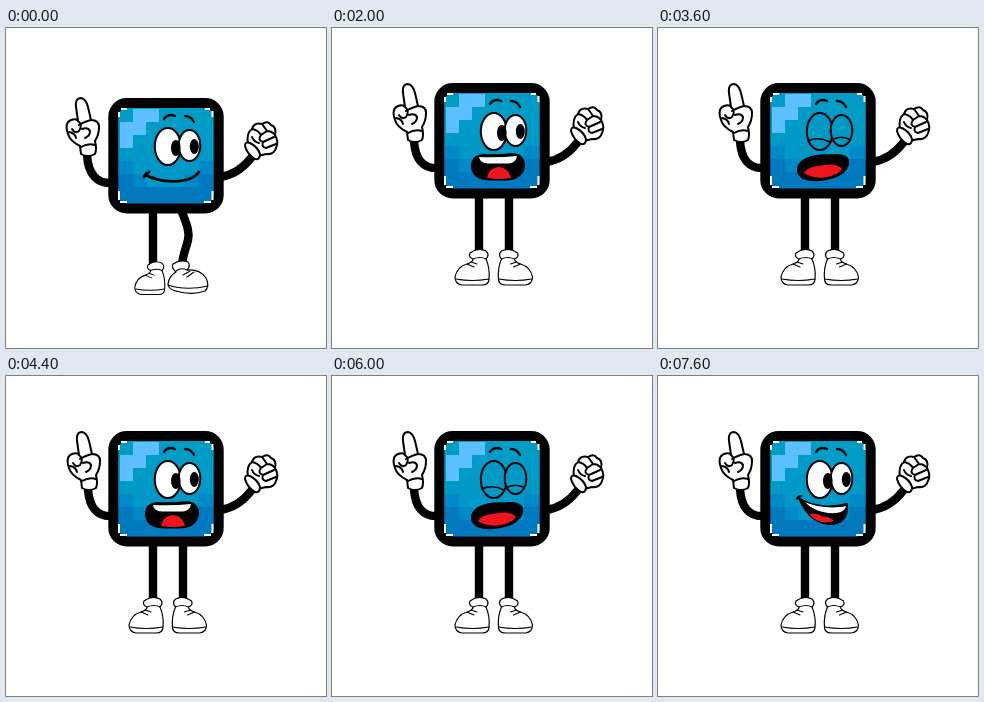
Recreate the animation shown at these times as an HTML page. Size 320 by 320 pixels, loop 8000 ms.

```html
<!DOCTYPE html>
<html lang="en">
<head>
<meta charset="utf-8">
<title>Dancing blue block</title>
<style>
html, body { margin: 0; width: 100%; height: 100%; overflow: hidden; background: #fff; }
svg { display: block; width: 100vw; height: 100vh; }
.line { fill: none; stroke: #000; stroke-linecap: round; stroke-linejoin: round; }
.limb { stroke-width: 8.4; }
.thin { stroke-width: 2; }
.lip { stroke-width: 2.8; }
.lace { stroke-width: 1.1; }
.glove { fill: #fff; stroke: #000; stroke-width: 2; stroke-linejoin: round; stroke-linecap: round; }
.shoe { fill: #fff; stroke: #000; stroke-width: 1.2; stroke-linejoin: round; }
.low { animation: low .8s step-end infinite; }
.high { animation: high .8s step-end infinite; }
.smile { animation: smile 8s step-end infinite; }
.shut { animation: shut 8s step-end infinite; }
.talk { animation: talk 8s step-end infinite; }
@keyframes low { 0% { opacity: 1 } 50%, 100% { opacity: 0 } }
@keyframes high { 0% { opacity: 0 } 50%, 100% { opacity: 1 } }
@keyframes smile { 0%, 30%, 60%, 90%, 100% { opacity: 1 } 10%, 40%, 70% { opacity: 0 } }
@keyframes shut { 10%, 40%, 70% { opacity: 1 } 0%, 20%, 50%, 80%, 100% { opacity: 0 } }
@keyframes talk { 20%, 50%, 80% { opacity: 1 } 0%, 30%, 60%, 90%, 100% { opacity: 0 } }
</style>
</head>
<body>
<svg viewBox="0 0 320 320">
<defs>
  <linearGradient id="sea" x1="0" y1="0" x2="0" y2="1">
    <stop offset="0" stop-color="#009dc6"/>
    <stop offset="1" stop-color="#0096c8"/>
  </linearGradient>

  <g id="block">
    <rect x="107" y="75" width="106" height="106" rx="13" fill="url(#sea)"/>
    <path fill="#5cc0ff" d="M127 81h26v13h-13v13h-13v13h-13V94h13z"/>
    <path fill="#0089c9" d="M112 133h15v13h13v13h39v-13h13v-13h16v43h-96z"/>
    <path fill="#0079be" d="M112 146h15v13h65v-13h16v30h-96z"/>
    <rect class="line" x="107.3" y="75" width="105.400" height="105.500" rx="13.500" style="stroke-width:10"/>
    <path d="M113 89v-5M115 81h6M199 81h5M206.500 83v6M113 163v9M114 174h7M198 174h7M206.500 163v9" fill="none" stroke="#fff" stroke-width="2"/>
    <path class="line" stroke-width="2.3" d="M158 91q4-6 11-3M179 88q6 0 9 6"/>
  </g>

  <g id="eyes">
    <ellipse cx="161.800" cy="118.500" rx="13" ry="18.500"/>
    <ellipse cx="183.500" cy="117.500" rx="10.800" ry="15.500"/>
  </g>
  <g id="look">
    <use href="#eyes" fill="#fff" stroke="#000" stroke-width="2"/>
    <ellipse cx="169.800" cy="120" rx="4.800" ry="8"/>
    <ellipse cx="188.300" cy="118.500" rx="4.500" ry="7.500"/>
  </g>

  <g id="point">
    <path class="glove" d="M72 93L70 79Q69 70 75 70Q80 71 82 79L85 92Q93 92 93 99Q93 107 89 113Q91 121 89 126Q82 130 75 126L74 118Q64 113 62 106Q58 95 65 92Q70 90 72 93Z"/>
    <path class="line thin" d="M72 93Q77 97 73 103Q69 106 66 101M63 104Q69 105 70 110M73 97Q80 93 85 92M76 101Q82 99 84 103Q84 108 79 110M75 119Q82 115 89 117"/>
  </g>

  <g id="fist">
    <path class="glove" d="M242 116Q240 105 246 101Q248 94 256 96Q262 92 265 97Q271 99 269 107Q273 114 270 120Q268 127 260 126L252 128Z"/>
    <path class="line thin" d="M246 101Q252 102 255 107L261 103Q266 103 269 107M255 107Q251 112 257 114L268 109M257 114Q255 119 260 120L270 116M256 96Q259 100 261 103M246 109Q248 114 253 115"/>
    <path class="glove" d="M239 118Q239 113 244 115Q252 119 254 126Q254 132 249 131Q241 126 239 118Z"/>
  </g>

  <g id="shoe">
    <path class="shoe" d="M138 225Q146 219 154 223Q158 227 154 231Q158 240 157 251Q157 257 150 257H130Q123 256 123 249Q125 239 135 236Q141 234 141 231Q136 229 138 225Z"/>
    <path class="line lace" d="M124 251Q140 254 157 251M141 231Q148 228 154 231M135 236L142 239M139 234L145 236"/>
  </g>
</defs>

<rect width="320" height="320" fill="#fff"/>

<g class="low">
  <path class="line limb" d="M106 155C91 156 82 146 81 127M214 149C229 147 238 139 245 130"/>
  <path class="line limb" d="M147 184V237M176 184C180 195 184 203 182 212C180 221 176 228 176 239"/>
  <use href="#shoe" transform="translate(20.5 30) scale(.88 .92)"/>
  <path class="shoe" d="M167 236Q174 231 182 234Q185 238 181 242Q194 241 200 250Q204 258 199 263Q188 267 174 264Q162 262 162 256Q163 248 170 244Q165 240 167 236Z"/>
  <path class="line lace" d="M162 257Q180 263 202 258M170 243Q175 239 181 242M177 247L184 243M181 249L188 244"/>
  <use href="#block"/>
  <use href="#look"/>
  <path class="line lip" d="M138 149Q139 146 143 144M140 147C152 154 182 158 193 144"/>
  <use href="#point"/>
  <use href="#fist"/>
</g>

<g class="high">
  <path class="line limb" d="M106 140C91 141 83 131 82 113M214 134C229 132 238 124 245 115"/>
  <path class="line limb" d="M147 168V226M177 168V226"/>
  <use href="#shoe"/>
  <use href="#shoe" transform="translate(323.5 0) scale(-1 1)"/>
  <use href="#block" y="-15"/>

  <g class="smile">
    <use href="#look" y="-15"/>
    <path d="M141 122C152 130 172 133 189 128C190 141 184 148 172 148C156 147 147 137 141 122Z" stroke="#000" stroke-width="2" stroke-linejoin="round"/>
    <path fill="#fff" d="M147 126C158 131 174 133 188 130Q187 136 178 137C165 138 153 133 147 126Z"/>
    <path fill="#f0141e" d="M151 138Q159 136 165 141Q171 140 176 145Q161 150 151 138Z"/>
    <path class="line thin" d="M139 123Q140 120 143 120"/>
  </g>

  <g class="shut">
    <use href="#eyes" y="-15" fill="#0099c6" stroke="#000" stroke-width="2"/>
    <path class="line" stroke-width="1.6" d="M150 113Q160 108 172 114M174 112Q182 107 191 111"/>
    <path d="M140 140C142 129 158 127 176 127C190 126 193 133 188 141C181 151 158 155 145 150Q139 146 140 140Z" stroke="#000" stroke-width="2"/>
    <path fill="#f0141e" d="M146 145C150 138 160 138 167 137Q179 135 184 141C178 150 157 153 146 145Z"/>
  </g>

  <g class="talk">
    <use href="#look" y="-15"/>
    <path d="M140 138Q140 128 151 127Q166 128 181 126Q192 127 192 138Q191 148 180 151Q166 152 152 151Q140 148 140 138Z" stroke="#000" stroke-width="2"/>
    <path fill="#fff" d="M147 129Q166 130 185 128Q184 135 177 135.500H156Q148 135 147 129Z"/>
    <path fill="#f0141e" d="M155 150Q157 141 163 140Q167 138 171 140Q177 142 179 150Q167 152 155 150Z"/>
  </g>

  <use href="#point" x="1" y="-14"/>
  <use href="#fist" y="-15"/>
</g>
</svg>
</body>
</html>
```
